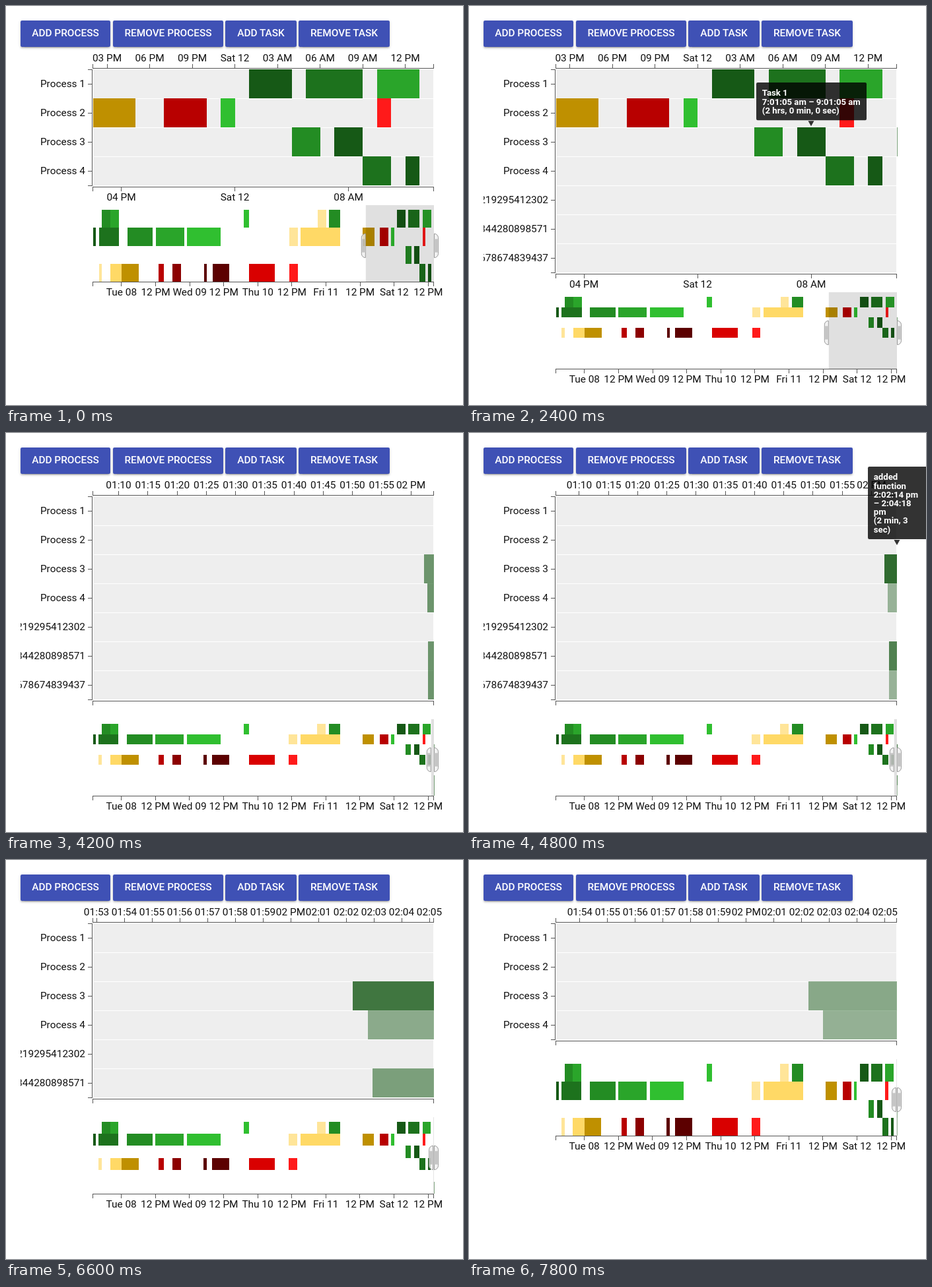
Recreate the animation shown at these times as an HTML page with a canvas. Size 692 by 605 pixels, loop 8 s.

```html
<!DOCTYPE html>
<html lang="en">
<head>
<meta charset="utf-8">
<title>Process timeline</title>
<style>
  html, body { margin: 0; width: 100%; height: 100%; overflow: hidden; background: #fff; }
  canvas { position: absolute; left: 0; top: 0; }
  .button {
    position: absolute; top: 22px; height: 39.6px; border-radius: 2.2px;
    background: #3f51b5; color: #fff; text-align: center; white-space: nowrap;
    font: 500 15.4px/39.6px Roboto, sans-serif;
    box-shadow: 0 3.3px 1.1px -2.2px rgba(0,0,0,.2), 0 2.2px 2.2px rgba(0,0,0,.14), 0 1.1px 5.5px rgba(0,0,0,.12);
  }
</style>
</head>
<body>
<canvas id="stage" width="692" height="605"></canvas>
<div class="button" style="left:22px;width:136px">ADD PROCESS</div>
<div class="button" style="left:162px;width:167px">REMOVE PROCESS</div>
<div class="button" style="left:332px;width:108px">ADD TASK</div>
<div class="button" style="left:443px;width:138px">REMOVE TASK</div>
<script>
const ctx = document.getElementById('stage').getContext('2d');
const LEFT = 132, RIGHT = 648, WIDTH = RIGHT - LEFT, TOP = 96, ROW = 44;
const SPAN = 120;                          // hours in the overview
const CLOCK = 14 + 1 / 60 + 5 / 3600;      // time of day at hour zero, a Monday
const DAYS = ['Mon 07', 'Tue 08', 'Wed 09', 'Thu 10', 'Fri 11', 'Sat 12'];
const AXIS = '#555', TEXT = '#111';

const colors = {
  a: '#165916', b: '#1d721d', c: '#238c23', d: '#2aa52a', e: '#30bf30',
  k: '#ffe599', l: '#ffd966', m: '#bf9000',
  r: '#ff1a1a', s: '#d90000', t: '#b80000', u: '#8c0000', v: '#5c0000'
};

// Tasks per process: colour, start hour, end hour.
const tasks = [
  'c3-6 d6-9 e53-55 k79-82 c83-87 a107-110 b111-115 d116-119',
  'a0-1 b2-9 c12-21 d22-32 e33-45 k69-72 l73-87 m95-99 t101-104 e105-106 r116-117',
  'c110-112 a113-115',
  'k2-3 l6-10 m10-16 t23-25 u28-31 v39-40 v42-48 s55-64 r69-72 b115-117 a118-119'
].map(line => line.split(' ').map(item => {
  const [start, end] = item.slice(1).split('-').map(Number);
  return { color: colors[item[0]], start, end };
}));

// Running tasks: process row and start in seconds past the initial end.
const running = [{ row: 2, at: 69 }, { row: 3, at: 101.5 }, { row: 5, at: 112 }, { row: 6, at: 113 }];
const names = ['Process 1', 'Process 2', 'Process 3', 'Process 4',
  '219295412302', '344280898571', '678674839437'];

const taskTip = {
  x: 435, y: 116, w: 167, arrow: 518,
  lines: ['Task 1', '7:01:05 am – 9:01:05 am', '(2 hrs, 0 min, 0 sec)']
};
const addedTip = (clock, sec) => ({
  x: 604, y: 51, w: 90, arrow: 648,
  lines: ['added', 'function', '2:02:14 pm', '– ' + clock, 'pm', `(2 min, ${sec}`, 'sec)']
});

const DAY = 24, HALF = 11.22, HOUR = 58.3 / 60, SHORT = 12.286 / 60;
const STEP = 600, LOOP = 8000;
const state = (rows, seconds, span, pulse = [], tip = null) => ({ rows, seconds, span, pulse, tip });
const states = [
  state(4, 8, DAY),
  state(5, 22, DAY),
  state(6, 36, DAY),
  state(7, 60, DAY),
  state(7, 90, DAY, [.6], taskTip),
  state(7, 118, DAY, [.7, .6, .6, .6]),
  state(7, 150, HALF, [.6, .5, .6, .6]),
  state(7, 172, HOUR, [.6, .6, .6, .6]),
  state(7, 196, HOUR, [.88, .4, .73, .4], addedTip('2:04:18', '3')),
  state(7, 212, HOUR, [.7, .5, .6, .5], addedTip('2:04:34', '19')),
  state(7, 229, SHORT, [.7, .5, .6, .5], addedTip('2:04:51', '36')),
  state(6, 245, SHORT, [.8, .46, .53]),
  state(5, 253, SHORT, [.6, .5]),
  state(4, 261, SHORT, [.47, .42])
];

function rect(x, y, w, h, color) {
  ctx.fillStyle = color;
  ctx.fillRect(x, y, w, h);
}

function label(text, x, y, align = 'center') {
  ctx.font = '15.4px Roboto, sans-serif';
  ctx.textAlign = align;
  ctx.fillStyle = TEXT;
  ctx.fillText(text, x, y);
}

function tickText(minutes) {
  const pad = n => String(n).padStart(2, '0');
  const hour = Math.floor(minutes / 60) % 24, minute = minutes % 60;
  const hour12 = pad(hour % 12 || 12);
  if (minute) return hour12 + ':' + pad(minute);
  return hour ? hour12 + (hour < 12 ? ' AM' : ' PM') : DAYS[Math.floor(minutes / 1440)];
}

function timeAxis(y, dir, end, span, step) {
  const tickY = dir < 0 ? y - 6 : y;
  const last = (end + CLOCK) * 60, first = last - span * 60;
  rect(LEFT, y, WIDTH, 1, AXIS);
  for (const x of [LEFT - 1, RIGHT - 1]) rect(x, tickY, 1, 7, AXIS);
  for (let m = Math.ceil(first / step) * step; m <= last; m += step) {
    const x = RIGHT - (last - m) / (span * 60) * WIDTH;
    rect(Math.round(x - .5), tickY, 1, 7, AXIS);
    label(tickText(m), x, dir < 0 ? y - 10 : y + 21);
  }
}

function bars(s, end, span, top, height) {
  const toX = h => Math.max(LEFT, Math.min(RIGHT, Math.round(RIGHT - (end - h) * WIDTH / span)));
  const bar = (row, start, stop, color) => {
    const x = toX(start), y = Math.round(top + row * height);
    rect(x, y, Math.max(1, toX(stop) - x), Math.round(top + (row + 1) * height) - y, color);
  };
  tasks.forEach((list, row) => list.forEach(t => {
    if (t.end > end - span) bar(row, t.start, t.end, t.color);
  }));
  running.forEach((t, i) => {
    if (!s.pulse[i]) return;
    ctx.globalAlpha = s.pulse[i];
    bar(t.row, SPAN + t.at / 3600, end, colors.a);
    ctx.globalAlpha = 1;
  });
}

function processes(rows) {
  for (let i = 0; i < rows; i++) rect(LEFT + 1, TOP + i * ROW + 1, WIDTH - 2, ROW - 1, '#eee');
  const bottom = TOP + rows * ROW;
  rect(130, TOP, 1, rows * ROW + 1, AXIS);
  for (const y of [TOP, bottom]) rect(124, y, 6, 1, AXIS);
  ctx.save();
  ctx.beginPath();
  ctx.rect(22, 0, 670, 605);
  ctx.clip();
  for (let i = 0; i < rows; i++) {
    const y = TOP + (i + .5) * ROW;
    rect(124, y, 6, 1, AXIS);
    label(names[i], 120, y + 5, 'right');
  }
  ctx.restore();
}

function handle(x, y, dir) {
  const h = 36.3;
  ctx.save();
  ctx.translate(x, y);
  ctx.scale(dir, 1);
  ctx.beginPath();
  ctx.moveTo(.5, 0);
  ctx.arcTo(6.5, 0, 6.5, 6, 6);
  ctx.lineTo(6.5, h - 6);
  ctx.arcTo(6.5, h, .5, h, 6);
  ctx.closePath();
  ctx.fillStyle = 'rgba(238,238,238,.8)';
  ctx.fill();
  for (const lineX of [2.5, 4.5]) {
    ctx.moveTo(lineX, 8);
    ctx.lineTo(lineX, h - 8);
  }
  ctx.strokeStyle = '#999';
  ctx.lineWidth = 1;
  ctx.stroke();
  ctx.restore();
}

function tooltip({ x, y, w, arrow, lines }) {
  const h = lines.length * 13.2 + 17.6, bottom = y + h;
  ctx.fillStyle = 'rgba(0,0,0,.8)';
  ctx.beginPath();
  ctx.roundRect(x, y, w, h, 2.2);
  ctx.fill();
  ctx.beginPath();
  ctx.moveTo(arrow - 4.5, bottom + 1);
  ctx.lineTo(arrow + 4.5, bottom + 1);
  ctx.lineTo(arrow, bottom + 9);
  ctx.fill();
  ctx.fillStyle = '#fff';
  ctx.font = 'bold 13.2px Roboto, sans-serif';
  ctx.textAlign = 'left';
  lines.forEach((line, i) => ctx.fillText(line, x + 8.8, y + 20.3 + i * 13.2));
}

function draw(s) {
  const end = SPAN + s.seconds / 3600;
  const bottom = TOP + s.rows * ROW, overview = bottom + 30;
  const step = s.span > 20 ? 180 : s.span > 5 ? 60 : s.span > .5 ? 5 : 1;
  ctx.clearRect(0, 0, 692, 605);
  processes(s.rows);
  bars(s, end, s.span, TOP, ROW);
  timeAxis(94, -1, end, s.span, step);
  timeAxis(bottom + 2, 1, end, s.span, 480);

  bars(s, end, SPAN, overview + 7, 109 / s.rows);
  const brush = s.span / SPAN * WIDTH;
  rect(RIGHT - brush, overview, brush, 116, 'rgba(0,0,0,.12)');
  timeAxis(overview + 116, 1, end, SPAN, 720);
  handle(RIGHT - brush, overview + 43.3, -1);
  handle(RIGHT, overview + 43.3, 1);
  if (s.tip) tooltip(s.tip);
}

function frame() {
  draw(states[Math.floor(performance.now() % LOOP / STEP)]);
  requestAnimationFrame(frame);
}
frame();
</script>
</body>
</html>
```
